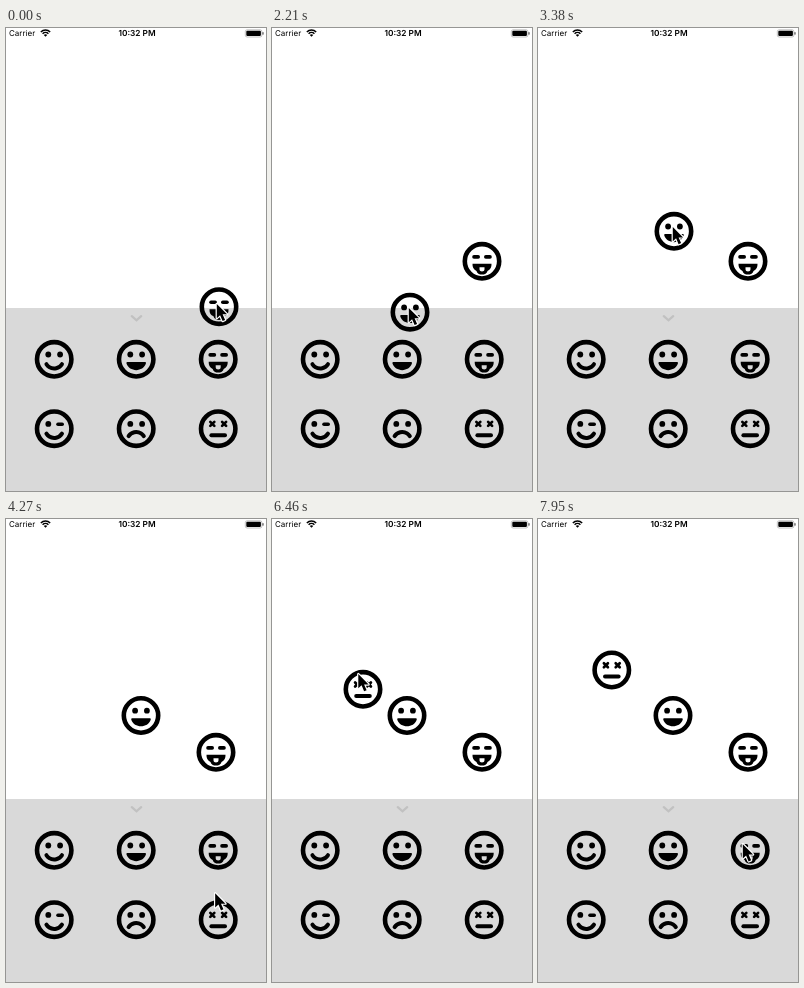
Animation, 260 px wide and 463 px high, one loop 8000 ms. Source, as an HTML page with a canvas:

```html
<!DOCTYPE html>
<html lang="en">
<head>
<meta charset="utf-8">
<title>Emoji tray</title>
<style>
  html, body { margin: 0; width: 100%; height: 100%; overflow: hidden; background: #fff; }
  canvas { display: block; width: 260px; height: 463px; }
</style>
</head>
<body>
<canvas id="stage"></canvas>
<script>
const W = 260, H = 463, LOOP = 8000, STEP = 147, TRAY_TOP = 280;
const canvas = document.getElementById('stage');
const ctx = canvas.getContext('2d');
const dpr = window.devicePixelRatio || 1;
canvas.width = W * dpr;
canvas.height = H * dpr;

// Where the pointer holds each dragged face, relative to its centre.
const grips = { tongue: [-3, -4], grin: [-2, -5.5], dead: [-5.5, -16.5], pointer: [0, 0] };

// Each move follows a quadratic curve: start point, control point, end point.
const moves = [
  { who: 'tongue', start: 0, end: 4, path: [[213, 278.7], [211, 250], [210, 233.3]] },
  { who: 'pointer', start: 7, end: 11, path: [[207, 230], [155, 315], [128, 334]] },
  { who: 'grin', start: 12, end: 20, path: [[130, 331], [145.5, 267], [135.2, 211.5]] },
  { who: 'grin', start: 20, end: 25, path: [[135.2, 211.5], [137, 205.7], [135, 196.5]] },
  { who: 'pointer', start: 26, end: 30, path: [[133, 191], [217, 381], [211, 388]] },
  { who: 'dead', start: 34, end: 42, path: [[212, 401], [96.7, 194.5], [98.5, 186]] },
  { who: 'dead', start: 42, end: 48, path: [[98.5, 186], [87.8, 159.5], [73.8, 151]] },
  { who: 'pointer', start: 50, end: 54, path: [[68.3, 134.5], [160, 275], [204, 324]] }
];

function along({ start, end, path: [from, via, to] }, step) {
  const p = Math.min(1, (step - start) / (end - start)), q = 1 - p;
  return [0, 1].map(i => q * q * from[i] + 2 * p * q * via[i] + p * p * to[i]);
}

function line(width, ...points) {
  ctx.lineWidth = width;
  ctx.beginPath();
  points.forEach(([x, y]) => ctx.lineTo(x, y));
  ctx.stroke();
}

function dot(x, y, r) {
  ctx.beginPath();
  ctx.arc(x, y, r, 0, 7);
  ctx.fill();
}

function arc(x, y, r, from, to, width) {
  ctx.lineWidth = width;
  ctx.beginPath();
  ctx.arc(x, y, r, from * Math.PI, to * Math.PI);
  ctx.stroke();
}

const dotEye = x => dot(x, -4.8, 2.9);
const dashEye = x => line(3.6, [x - 2.1, -4.4], [x + 2.1, -4.4]);
const smile = () => arc(0, 0, 9.2, 0.18, 0.82, 4);

function crossEye(x) {
  line(2.7, [x - 2, -6.8], [x + 2, -2.8]);
  line(2.7, [x + 2, -6.8], [x - 2, -2.8]);
}

function eyes(left, right = left) {
  left(-5.9);
  right(5.9);
}

const features = {
  smile() { eyes(dotEye); smile(); },
  wink() { eyes(dotEye, dashEye); smile(); },
  sad() { eyes(dotEye); arc(0, 12.3, 9, 1.18, 1.82, 4); },
  dead() { eyes(crossEye); line(4, [-6.8, 6.6], [6.8, 6.6]); },
  grin() {
    eyes(dotEye);
    ctx.beginPath();
    ctx.moveTo(-9, 2.8);
    ctx.lineTo(9, 2.8);
    ctx.quadraticCurveTo(10.2, 2.8, 9.7, 4.3);
    ctx.bezierCurveTo(7, 13, -7, 13, -9.7, 4.3);
    ctx.quadraticCurveTo(-10.2, 2.8, -9, 2.8);
    ctx.fill();
  },
  tongue() {
    eyes(dashEye);
    ctx.beginPath();
    ctx.moveTo(-9.5, 2.5);
    ctx.lineTo(9.5, 2.5);
    ctx.quadraticCurveTo(9.8, 8, 5.5, 9.6);
    ctx.bezierCurveTo(4.8, 14.4, -4.8, 14.4, -5.5, 9.6);
    ctx.quadraticCurveTo(-9.8, 8, -9.5, 2.5);
    // The tongue is a hole that shows whatever lies behind.
    ctx.moveTo(-2.5, 6);
    ctx.lineTo(2.5, 6);
    ctx.lineTo(2.5, 8);
    ctx.bezierCurveTo(2.5, 11, -2.5, 11, -2.5, 8);
    ctx.closePath();
    ctx.fill('evenodd');
  }
};

function face(kind, x, y) {
  ctx.save();
  ctx.translate(x, y);
  ctx.fillStyle = ctx.strokeStyle = '#000';
  ctx.lineCap = 'round';
  arc(0, 0, 17.2, 0, 2, 4.6);
  features[kind]();
  ctx.restore();
}

function statusBar() {
  ctx.fillStyle = ctx.strokeStyle = '#000';
  ctx.textRendering = 'geometricPrecision';
  ctx.textAlign = 'left';
  ctx.font = '400 8px Inter, sans-serif';
  ctx.fillText('Carrier', 3, 8.3);
  ctx.textAlign = 'center';
  ctx.font = '600 8.3px Inter, sans-serif';
  ctx.fillText('10:32 PM', 131, 8.3);

  ctx.lineCap = 'butt';
  for (const r of [6.6, 4.1]) arc(39.5, 8.6, r, 1.25, 1.75, 1.5);
  ctx.beginPath();
  ctx.moveTo(39.5, 8.8);
  ctx.arc(39.5, 8.8, 2.4, 1.25 * Math.PI, 1.75 * Math.PI);
  ctx.fill();

  ctx.lineWidth = 0.6;
  ctx.strokeStyle = '#999';
  ctx.beginPath();
  ctx.roundRect(239.3, 1.8, 16.6, 7.2, 1.8);
  ctx.stroke();
  ctx.beginPath();
  ctx.roundRect(240.3, 2.7, 14.6, 5.4, 1);
  ctx.fill();
  ctx.fillRect(256.6, 4.2, 0.8, 2.4);
}

function chevron() {
  ctx.strokeStyle = '#c1c1c1';
  ctx.lineCap = 'round';
  ctx.lineJoin = 'miter';
  line(2.3, [125.8, 288.2], [130.5, 292.3], [135.2, 288.2]);
}

function pointer(x, y) {
  ctx.save();
  ctx.translate(x + 0.8, y + 1.2);
  ctx.beginPath();
  [[0, 0], [0, 14.3], [3.3, 11.3], [5.8, 17.2], [8.3, 16.1], [5.8, 10.4], [10.3, 10.4]]
    .forEach(([px, py]) => ctx.lineTo(px, py));
  ctx.closePath();
  ctx.lineJoin = 'round';
  ctx.lineWidth = 2.4;
  ctx.strokeStyle = '#fff';
  ctx.stroke();
  ctx.fillStyle = '#000';
  ctx.fill();
  ctx.restore();
}

function tray() {
  const kinds = ['smile', 'grin', 'tongue', 'wink', 'sad', 'dead'];
  kinds.forEach((kind, i) => face(kind, 48.2 + 82 * (i % 3), 331.3 + 69.4 * Math.floor(i / 3)));
}

const coversChevron = ([x, y]) => Math.abs(x - 130.5) < 26 && Math.abs(y - 290.5) < 23;

function draw(time) {
  const step = Math.floor((time % LOOP + 12) / STEP);
  const spots = {};
  let active = moves[0];
  for (const move of moves) {
    if (move.start > 0 && step <= move.start) break;
    active = move;
    spots[move.who] = along(move, step);
  }
  const [x, y] = spots[active.who];
  const [gripX, gripY] = grips[active.who];

  ctx.setTransform(dpr, 0, 0, dpr, 0, 0);
  ctx.fillStyle = '#fff';
  ctx.fillRect(0, 0, W, H);
  ctx.fillStyle = '#d9d9d9';
  ctx.fillRect(0, TRAY_TOP, W, H - TRAY_TOP);
  statusBar();
  delete spots.pointer;
  if (!Object.values(spots).some(coversChevron)) chevron();
  tray();
  for (const kind in spots) face(kind, ...spots[kind]);
  pointer(x + gripX, y + gripY);
}

const start = performance.now();
function tick() {
  draw(performance.now() - start);
  requestAnimationFrame(tick);
}
tick();
</script>
</body>
</html>
```
